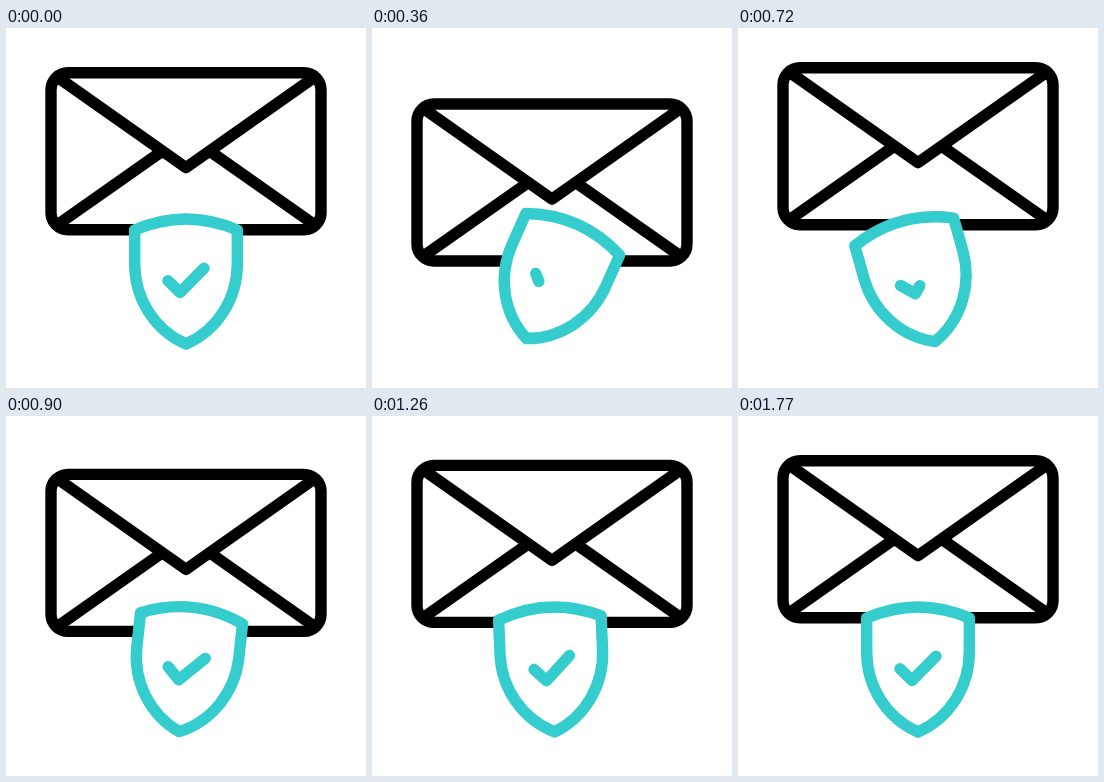
An HTML page that plays this animation: 360 by 360 pixels, repeating every 1.8 s.

```html
<!DOCTYPE html>
<html lang="en">
<head>
<meta charset="utf-8">
<title>Secure mail</title>
<style>
  html, body { margin: 0; width: 100%; height: 100%; overflow: hidden; background: #fff; }
  svg { display: block; width: 100%; height: 100%; }
  g { fill: none; stroke-width: 11.4; stroke-linejoin: round; stroke-linecap: round; }
</style>
</head>
<body>
<svg viewBox="0 0 360 360">
  <g id="mail" stroke="#000">
    <rect x="45" y="44.7" width="270" height="157" rx="17"/>
    <path d="M52 49.5L180 139.7L308 49.5M52 196.4L155 124M308 196.4L205 124"/>
  </g>
  <g id="shield" stroke="#35cccd">
    <path fill="#fff" d="M128.7 202Q180 180 231.3 202V236C231.3 270 212 302 180 316C148 302 128.7 270 128.7 236Z"/>
    <path id="tick" pathLength="100" d="M162 252.7L174 264.5L198 240.3"/>
  </g>
</svg>
<script>
const LOOP = 1800, STEPS = 50, SLOTS = 60;
const [mail, shield, tick] = ["mail", "shield", "tick"].map(id => document.getElementById(id));

const ramp = (t, from, to) => Math.min(1, Math.max(0, (t - from) / (to - from)));
const ease = (t, from, to) => (1 - Math.cos(Math.PI * ramp(t, from, to))) / 2;

// Down, rebound past rest, second dip, settle.
const drop = t =>
  33.6 * ease(t, 0, 12) - 38.6 * ease(t, 12, 20) + 20 * ease(t, 20, 26) - 15 * ease(t, 26, 40.5);

// Swing out, then oscillate back with a fading amplitude.
function tilt(t) {
  const peak = 12.2, end = 42, halfSwing = 7.5;
  if (t < peak) return 26 * ease(t, 0, peak);
  const fade = (1 - ramp(t, peak, end)) ** 1.64;
  return 26 * fade * Math.cos(Math.PI * (t - peak) / halfSwing);
}

// Visible percentage of the check mark: erased, then redrawn.
const drawn = t => 100 * (1 - ramp(t, 3.75, 11.3) + ramp(t, 15.8, 24));

function render(ms) {
  // Poses are held on a coarser grid than the time slots.
  const slot = Math.floor(ms % LOOP / LOOP * SLOTS + 1e-6);
  const t = Math.floor(slot * STEPS / SLOTS + 1e-6);
  mail.setAttribute("transform", `translate(0 ${drop(t)})`);
  shield.setAttribute("transform", `rotate(${tilt(t)} 180 253)`);
  tick.setAttribute("stroke-dasharray", `${Math.max(drawn(t), 1)} 200`);
}

const start = performance.now();
function play() {
  render(performance.now() - start);
  requestAnimationFrame(play);
}
play();
</script>
</body>
</html>
```
